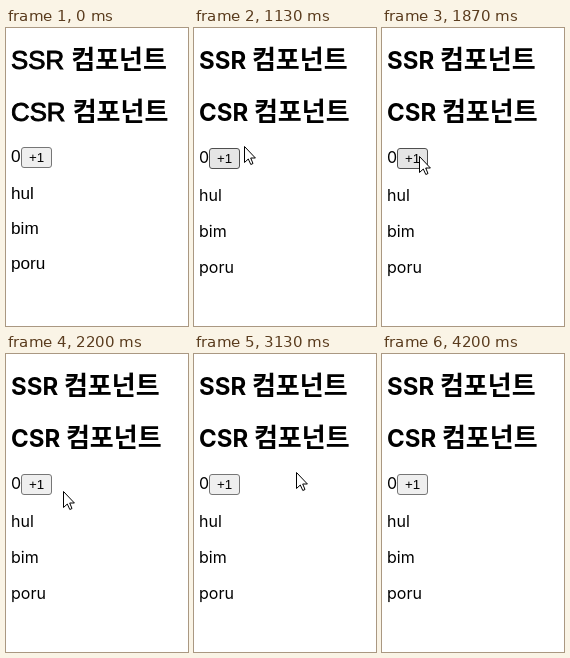
Recreate the animation shown at these times as an HTML page. Size 182 by 298 pixels, loop 4740 ms.

```html
<!DOCTYPE html>
<html lang="ko">
<head>
<meta charset="utf-8">
<title>SSR / CSR</title>
<style>
  html, body { margin: 0; width: 100%; height: 100%; overflow: hidden; background: #fff; }
  svg { display: block; }
  .web { font: 16px Inter, sans-serif; }
  .web .head { font-size: 24px; font-weight: 700; }
  .fallback { font: 17.2px "Liberation Sans", Arial, sans-serif; }
  .fallback .head { font-size: 25.8px; stroke: #000; stroke-width: .9px; }
  .head .ko { font: 700 26px "Noto Sans CJK KR", "Noto Sans CJK", sans-serif; stroke: none; }
  .label { font: 13.333px "Liberation Sans", Arial, sans-serif; }
</style>
</head>
<body>
<svg width="182" height="298" viewBox="0 0 182 298">
  <g id="page"></g>
  <g id="button">
    <rect id="face" x="15.5" y="120.5" width="30" height="20" rx="2.5"/>
    <text class="label" x="22.9" y="135">+1</text>
  </g>
  <path id="cursor" d="M.5 .5V16.5L4.3 13 6.8 18.5 9 17.5 6.7 12H11.4Z" fill="#fff" stroke="#000"/>
</svg>
<script>
const LOOP = 4740, FONT_READY = 530;
const HOVER = [1130, 2130];
const PRESSES = [[1400, 1470], [1600, 1670], [1800, 1870]];

// time, x, y of the pointer tip
const PATH = [
  [870, 166, 157], [930, 140, 145], [1000, 106, 132], [1070, 74, 123],
  [1130, 50, 118], [1200, 41, 122], [1270, 38, 126], [1330, 37, 128],
  [2000, 38, 129], [2070, 41, 130], [2130, 48, 133], [2200, 57, 137],
  [2270, 67, 141], [2400, 80, 146], [2470, 92, 151], [2530, 110, 161],
  [2930, 92, 176], [3000, 71, 160], [3070, 76, 132], [3130, 102, 118],
  [3200, 134, 124], [3270, 146, 148], [3330, 122, 172], [3400, 87, 162],
  [3470, 112, 136], [3530, 153, 157], [3600, 165, 178], [3670, 170, 191],
  [3730, 172, 199], [3870, 173, 204], [4130, 177, 205], [4200, 190, 210]
];
const FACES = {
  idle: ['#efefef', '#767676'],
  hover: ['#e5e5e5', '#4f4f4f'],
  press: ['#f5f5f5', '#8d8d8d']
};

const $ = id => document.getElementById(id);
const within = (t, [from, to]) => t >= from && t < to;
const line = (y, text) => `<text x="5" y="${y}">${text}</text>`;
const heading = (y, word) =>
  `<text class="head" x="5" y="${y}">${word} <tspan class="ko">컴포넌트</tspan></text>`;

function layout(kind, zeroY, listY, gap) {
  const names = ['hul', 'bim', 'poru'].map((name, i) => line(listY + i * gap, name));
  return `<g class="${kind}">${heading(41, 'SSR')}${heading(93, 'CSR')}` +
    `${line(zeroY, '0')}${names.join('')}</g>`;
}

$('page').innerHTML = layout('fallback', 134, 171, 35) + layout('web', 135, 173, 36);
const [fallback, web] = $('page').children;
const show = (el, on) => el.setAttribute('visibility', on ? 'visible' : 'hidden');

function draw(t) {
  const ready = t >= FONT_READY;
  show(fallback, !ready);
  show(web, ready);
  $('button').setAttribute('transform', `translate(0 ${ready ? 0 : -1})`);

  const state = PRESSES.some(p => within(t, p)) ? 'press' : within(t, HOVER) ? 'hover' : 'idle';
  const [fill, stroke] = FACES[state];
  $('face').setAttribute('fill', fill);
  $('face').setAttribute('stroke', stroke);

  const step = PATH.filter(p => p[0] <= t).pop();
  show($('cursor'), step);
  if (step) $('cursor').setAttribute('transform', `translate(${step[1]} ${step[2]})`);
}

const start = performance.now();
function tick() {
  draw((performance.now() - start) % LOOP);
  requestAnimationFrame(tick);
}
tick();
</script>
</body>
</html>
```
